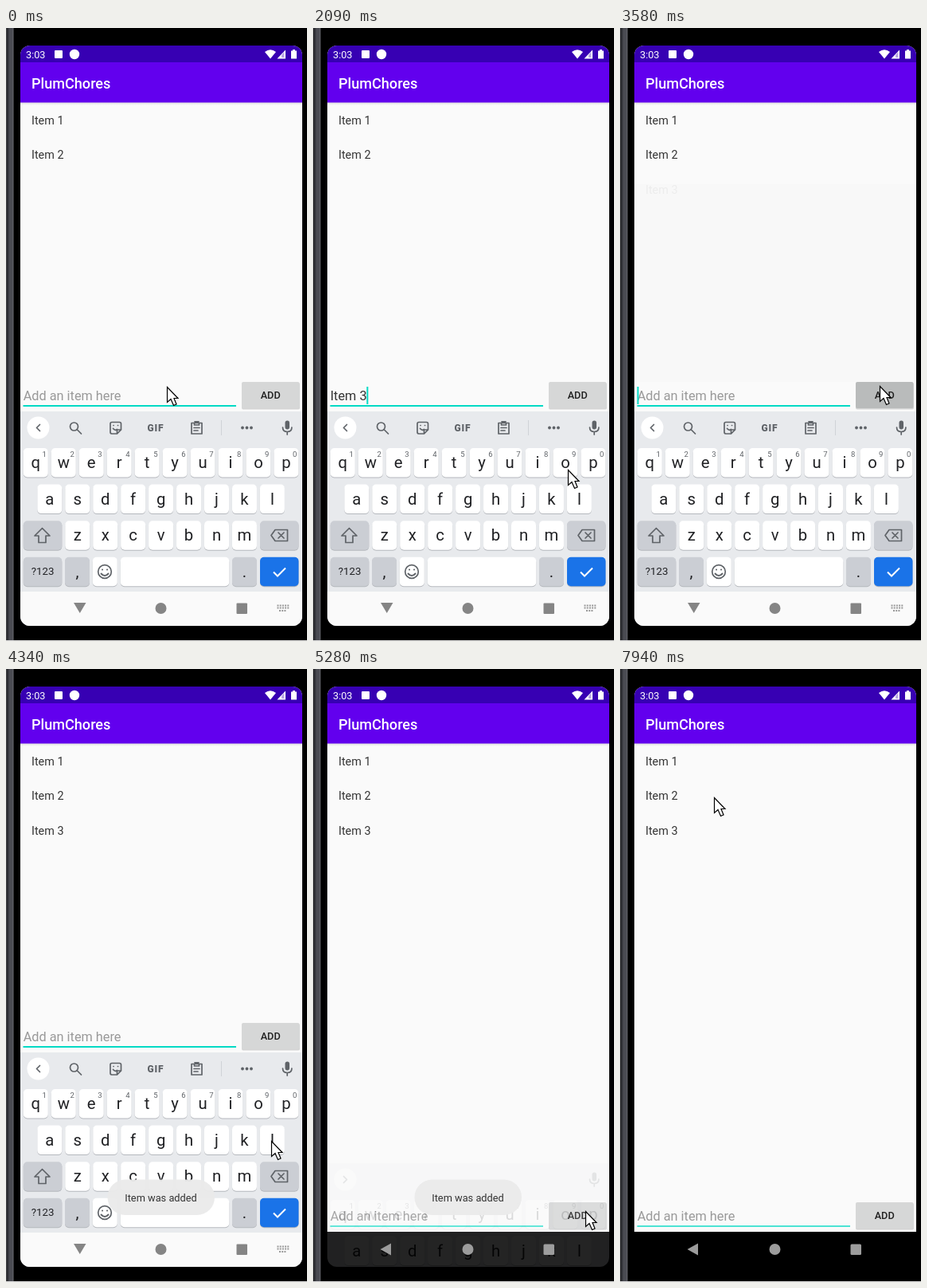
Recreate the animation shown at these times as an HTML page. Size 378 px wide and 769 px high, loop 8 s.

```html
<!DOCTYPE html>
<html lang="en">
<head>
<meta charset="utf-8">
<title>To-do list</title>
<style>
  html, body { margin: 0; width: 100%; height: 100%; overflow: hidden; background: #000; }
  svg { display: block; width: 100vw; height: 100vh; font-family: Roboto, sans-serif; }
  .line { fill: none; stroke: #5f6368; stroke-width: 1.7; stroke-linejoin: round; stroke-linecap: round; }
  .icon { fill: #5f6368; }
  .mid { text-anchor: middle; }
</style>
</head>
<body>
<svg viewBox="0 0 378 769" xmlns="http://www.w3.org/2000/svg">
  <defs>
    <clipPath id="screen"><rect x="18" y="22" width="354" height="728" rx="12"/></clipPath>
    <linearGradient id="bezel">
      <stop offset="0" stop-color="#555"/>
      <stop offset=".15" stop-color="#26272b"/>
      <stop offset=".45" stop-color="#4a4b52"/>
      <stop offset=".8" stop-color="#4a4b52"/>
      <stop offset=".9" stop-color="#6c6d72"/>
      <stop offset="1" stop-color="#000"/>
    </linearGradient>
    <linearGradient id="shade" x2="0" y2="1">
      <stop offset="0" stop-color="#dcdcdc"/>
      <stop offset="1" stop-color="#fafafa"/>
    </linearGradient>
  </defs>
  <rect width="378" height="769"/>
  <rect width="10" height="769" fill="url(#bezel)"/>
  <rect y="768" width="378" height="1" fill="#d8d8d8"/>

  <g clip-path="url(#screen)">
    <rect x="18" y="22" width="354" height="684" fill="#fafafa"/>
    <rect id="dim" x="18" y="196" width="354" height="248" fill="#f8f8f8"/>
    <rect x="18" y="93" width="354" height="4" fill="url(#shade)"/>
    <rect x="18" y="22" width="354" height="22" fill="#3700b3"/>
    <rect x="18" y="43" width="354" height="50.5" fill="#6200ee"/>
    <g fill="#fff">
      <text x="25" y="37.5" font-size="12.7">3:03</text>
      <rect x="61" y="28" width="10" height="10" rx="1"/>
      <circle cx="86" cy="33" r="6.2"/>
      <path d="M325 30Q332 24.5 339 30L332 38.5Z"/>
      <path d="M340.5 38.5L351 27.5V38.5Z"/>
      <path d="M358 28.5h2v-1.5h3v1.5h2v10h-7Z"/>
      <path d="M346 37V34L349.5 30V37Z" fill="#3700b3" opacity=".35"/>
      <text x="32" y="76" font-size="18.1" font-weight="500">PlumChores</text>
    </g>
    <g font-size="14.4" fill="#333">
      <text x="32" y="121">Item 1</text>
      <text x="32" y="164">Item 2</text>
      <text id="newItem" x="32" y="207.5">Item 3</text>
    </g>
    <g id="entry">
      <rect x="296" y="445" width="73" height="33.5" rx="2" fill="#bbb" opacity=".6"/>
      <rect id="add" x="296" y="444" width="72.5" height="33" rx="2"/>
      <text class="mid" x="332.2" y="465" font-size="12.7" font-weight="500" fill="#222">ADD</text>
      <rect id="rule" x="21.5" y="473" width="267.5" height="2" fill="#03dac5"/>
      <text id="field" x="21.7" y="467" font-size="16.3"></text>
      <rect id="composing" x="22" y="469" height="1" fill="#333"/>
      <rect id="caret" y="450" width="2" height="22" fill="#03dac5"/>
    </g>

    <rect x="18" y="706" width="354" height="44"/>
    <g id="keyboard">
      <rect x="18" y="481" width="354" height="269" fill="#e8eaed"/>
      <circle cx="40.5" cy="501.5" r="14" fill="#fff"/>
      <path id="chevron" class="line" d="M42.5 497.5l-4 4l4 4"/>
      <g id="tools">
        <g class="line">
          <circle cx="85.5" cy="500" r="5"/><path d="M89.5 504L94.5 509"/>
          <path d="M131 496.5q0-2 2-2h9.5q2 0 2 2v7.5l-5 5h-6.5q-2 0-2-2ZM139.5 509v-5h5M134.5 502.5q2.5 3 5 1M135 498.5h.1M140.5 498.5h.1"/>
          <path d="M233 495.5h13v13.5h-13ZM236.5 495.5v2.5h6v-2.5M237 493.8h5M236 501.5h7M236 505h5"/>
        </g>
        <text class="icon mid" x="188" y="505.8" font-size="12" font-weight="900" letter-spacing=".8">GIF</text>
        <path d="M270.5 492V511" stroke="#d0d3d7"/>
        <g class="icon"><circle cx="297" cy="501.5" r="1.9"/><circle cx="302.5" cy="501.5" r="1.9"/><circle cx="308" cy="501.5" r="1.9"/></g>
      </g>
      <rect class="icon" x="350.5" y="492.5" width="5.5" height="11" rx="2.75"/>
      <path class="line" d="M347.5 501q0 5.5 5.7 5.5t5.7-5.5M353.2 507v3"/>
      <g id="keys"></g>
      <g class="line">
        <path d="M45.5 627.5L55 637H50V645.5H41V637H36Z"/>
        <path d="M338 629.5h15.5v14h-15.5l-5-7ZM342 633l7 7M349 633l-7 7"/>
        <circle cx="124" cy="682" r="8.3"/>
        <path d="M119.5 684.5q4.5 5 9 0M121 679.5h.1M127 679.5h.1" stroke-width="2"/>
      </g>
      <path d="M336 682.5l5 5l10-10" fill="none" stroke="#fff" stroke-width="2"/>
      <g id="lightNav">
        <rect x="18" y="707" width="354" height="43" fill="#fafafa"/>
        <g fill="#858585">
          <path d="M85 721h15.5l-7.75 13Z"/>
          <circle cx="194.5" cy="728" r="7"/>
          <rect x="289.5" y="721.5" width="13.5" height="13.5" rx="1"/>
        </g>
        <path id="imeIcon" d="M340.5 724.5h15M340.5 727.5h15M343 731h9" stroke="#999" stroke-width="2" stroke-dasharray="2 1.2"/>
      </g>
    </g>
    <g id="darkNav" fill="#9c9c9c">
      <path d="M98 720.5v15l-13.5-7.5Z"/>
      <circle cx="194.5" cy="728" r="7"/>
      <rect x="289.5" y="721.5" width="13.5" height="13.5" rx="1.5"/>
    </g>
    <g id="toast">
      <rect x="127.5" y="640.5" width="134.5" height="44.5" rx="22" fill="#ebebeb" opacity=".96"/>
      <text class="mid" x="194.5" y="668" font-size="12.8" fill="#333">Item was added</text>
    </g>
  </g>
  <path id="pointer" d="M.5 .5V19.5L5 15.5L8.5 23.5L12 22L9 14.5H14Z" fill="#fff" stroke="#000" stroke-width="1.2"/>
</svg>
<script>
const LOOP = 8000;
const STEP = 121.2; // the pointer moves in held steps
const BLINK = 970;
const ADDED = 3580;
const CONFIRMED = 5040;
const CLOSING = 5280;
const CLOSED = 5400;

const $ = id => document.getElementById(id);
const set = (id, attrs) => {
  for (const name in attrs) $(id).setAttribute(name, attrs[name]);
};
const show = (id, visible) => set(id, { opacity: Number(visible) });
const ramp = (t, from, to) => Math.min(1, Math.max(0, (t - from) / (to - from)));
const smooth = u => u * u * (3 - 2 * u);

// Keyboard
const PITCH = 34.95, KEY = 31, WIDE = 48.5;
const WHITE = '#fff', GREY = '#cbced4';
const rowTop = row => 527 + row * 45.6;

function key(x, row, width, fill, label = '', size = 20.3, id = 'key') {
  const y = rowTop(row);
  return `<rect x="${x}" y="${y + 1}" width="${width}" height="36.5" rx="5" fill="#b5b8bd"/>
    <rect class="${id}" x="${x}" y="${y}" width="${width}" height="36.5" rx="5" fill="${fill}"/>
    <text class="mid" x="${x + width / 2}" y="${y + 18 + size * .34}" font-size="${size}" fill="#202124">${label}</text>`;
}

function buildKeys() {
  let keys = '';
  ['qwertyuiop', 'asdfghjkl', 'zxcvbnm'].forEach((letters, row) => {
    const left = 194.6 - (letters.length - 1) * PITCH / 2 - KEY / 2;
    [...letters].forEach((letter, i) => {
      const x = left + i * PITCH;
      keys += key(x, row, KEY, WHITE, letter);
      if (row === 0) keys += `<text class="mid" x="${x + 26.3}" y="537.5" font-size="9.5" fill="#5f6368">${(i + 1) % 10}</text>`;
    });
  });
  for (const x of [21.8, 319]) keys += key(x, 2, WIDE, GREY);
  return keys + key(21.8, 3, WIDE, GREY, '?123', 13.3) + key(74, 3, KEY, GREY, ',')
    + key(108.8, 3, KEY, WHITE) + key(143.8, 3, 136.5, WHITE)
    + key(284, 3, KEY, GREY, '.') + key(319, 3, WIDE, '#1a73e8', '', 20, 'enter');
}
$('keys').innerHTML = buildKeys();
const enter = document.querySelector('.enter');

// Key points of the pointer: time, x, y
const route = [
  [670, 202, 450], [1030, 307, 485], [1790, 307, 485], [2080, 320, 554],
  [2550, 341, 681], [2900, 341, 681], [3400, 326, 449], [4050, 326, 449],
  [4450, 339, 704], [4730, 340, 663], [4880, 342, 680], [5450, 342, 680],
  [5780, 204, 721], [6060, 194, 725], [6830, 194, 725], [7250, 123, 195], [7900, 118, 161]
];

function pointerAt(t) {
  const held = (Math.floor(t / STEP - .2) + .2) * STEP;
  const next = route.findIndex(point => point[0] > held);
  if (next < 1) return route.at(next).slice(1);
  const [t0, x0, y0] = route[next - 1], [t1, x1, y1] = route[next];
  const u = smooth(ramp(held, t0, t1));
  return [x0 + (x1 - x0) * u, y0 + (y1 - y0) * u].map(Math.round);
}

// Typing
const entryText = 'Item 3';
const keystrokes = [390, 510, 790, 910, 1150, 1970];

function drawField(t) {
  const strokes = keystrokes.filter(time => time <= t);
  const text = t < ADDED ? entryText.slice(0, strokes.length) : '';
  const lastEdit = t < ADDED ? strokes.at(-1) : ADDED - 20;

  $('field').textContent = text || 'Add an item here';
  set('field', { fill: text ? '#333' : '#999' });
  const letters = text.trimEnd().length;
  const width = letters ? $('field').getSubStringLength(0, letters) + (text.length - letters) * 4 : 0;
  set('caret', { x: 21.5 + width });
  show('caret', (t - lastEdit) % BLINK < BLINK / 2);
  set('composing', { width });
  show('composing', text && t < 1300);
}

function draw(t) {
  const closing = t >= CLOSING;
  const pressed = t >= ADDED && t < ADDED + 200;

  drawField(t);
  set('pointer', { transform: `translate(${pointerAt(t)})` });
  show('newItem', t < ADDED ? 0 : .05 + .95 * ramp(t, ADDED, 3900));
  show('dim', pressed);
  show('toast', ramp(t, 3700, 4000) * (1 - ramp(t, 5450, 5900)));
  set('add', { fill: pressed ? '#b9bbbb' : '#d6d7d7' });
  enter.setAttribute('fill', t >= CONFIRMED ? '#185abc' : '#1a73e8');

  set('entry', { transform: `translate(0 ${closing ? 225 : 0})` });
  show('rule', closing ? .7 : 1);
  set('keyboard', { transform: `translate(0 ${closing ? 139 : 0})` });
  show('keyboard', t >= CLOSED ? 0 : closing ? .14 : 1);
  set('chevron', { transform: closing ? 'translate(81 0) scale(-1 1)' : '' });
  show('tools', !closing);
  show('lightNav', !closing);
  show('imeIcon', t < CONFIRMED + 120);
  show('darkNav', closing);
}

const start = performance.now();
function tick() {
  draw((performance.now() - start) % LOOP);
  requestAnimationFrame(tick);
}
tick();
</script>
</body>
</html>
```
